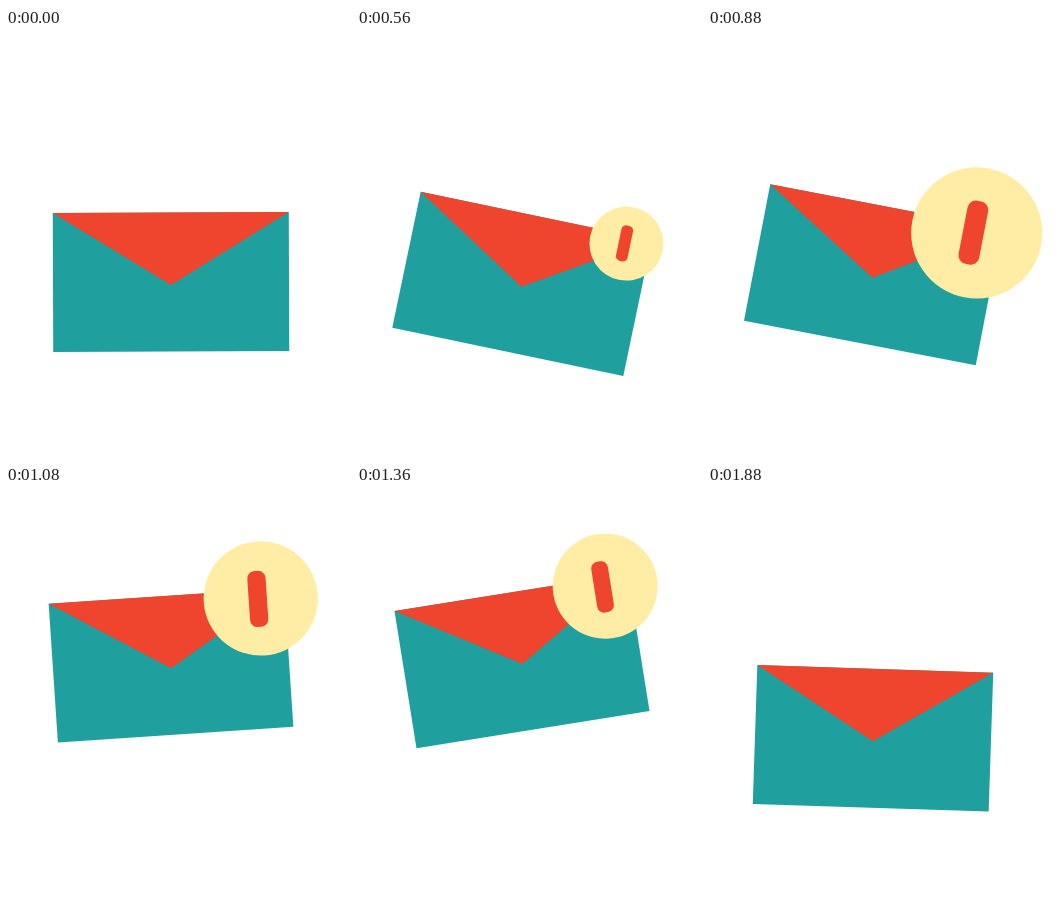
An HTML page that plays this animation: 345x429 px, repeating every 1.92 s.

```html
<!DOCTYPE html>
<html lang="en">
<head>
<meta charset="utf-8">
<title>Ringing envelope</title>
<style>
  html, body { margin: 0; width: 100%; height: 100%; overflow: hidden; background: #fff; }
  svg { display: block; }
</style>
</head>
<body>
<svg width="345" height="429" viewBox="0 0 345 429">
  <g id="envelope">
    <rect x="-118" y="-69.5" width="236" height="139" fill="#1f9f9e"/>
    <path d="M-118-69.5h236L0 3z" fill="#ef442d"/>
    <g id="badge">
      <circle r="1" fill="#ffeda5"/>
      <rect x="-.212" y="-.485" width=".32" height=".98" rx=".13" fill="#ef442d"/>
    </g>
  </g>
</svg>
<script>
  const LOOP = 1920, STEP = 40;
  const RING_START = 410, SWING = 151, SWINGS = 10;
  const REST = -.2, RIGHT = 11.8, LEFT = -14.5;
  const envelope = document.getElementById('envelope');
  const badge = document.getElementById('badge');

  const progress = (t, from, to) => Math.min(1, Math.max(0, (t - from) / (to - from)));

  function ease(t, from, to) {
    const u = progress(t, from, to);
    return u * u * (3 - 2 * u);
  }

  // Sink a little, drop, leap up, hang, then settle back.
  const height = t => 254 - 18.8 * ease(t, 0, 460) + 54.8 * ease(t, 460, 700)
    - 114 * ease(t, 700, 1130) + 78 * ease(t, 1460, 1905);

  // Pop in, settle, shrink away.
  const radius = t => 74 * ease(t, 440, 680) - 21.5 * progress(t, 680, 1190)
    - 52.5 * ease(t, 1460, 1757);

  // Angle at the end of each swing: right and left in turn, at rest first and last.
  const swingAngle = n => n <= 0 || n >= SWINGS ? REST : n % 2 ? RIGHT : LEFT;

  function tilt(t) {
    const swing = (t - RING_START) / SWING, n = Math.floor(swing);
    const from = swingAngle(n), to = swingAngle(n + 1);
    return from + (to - from) * ease(swing, n, n + 1);
  }

  function draw(now) {
    const t = Math.floor(now % LOOP / STEP) * STEP;
    envelope.setAttribute('transform', `translate(165 ${height(t)}) rotate(${tilt(t)})`);
    badge.setAttribute('transform', `translate(94 -60.7) scale(${radius(t)})`);
  }

  const start = performance.now();
  function tick() {
    draw(performance.now() - start);
    requestAnimationFrame(tick);
  }
  tick();
</script>
</body>
</html>
```
